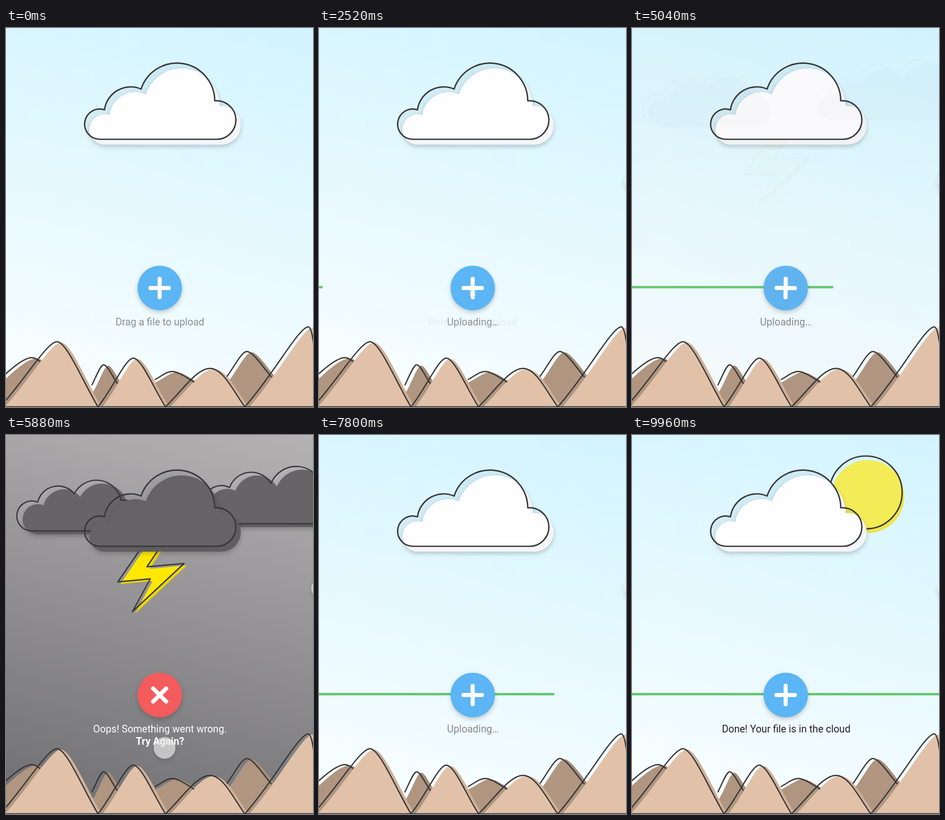
Recreate the animation shown at these times as an HTML page. Size 600 px wide and 739 px high, loop 10 s.

```html
<!DOCTYPE html>
<html lang="en">
<head>
<meta charset="utf-8">
<title>Upload</title>
<style>
  html, body { margin: 0; width: 100%; height: 100%; overflow: hidden; }
  body { background: linear-gradient(195deg, #d2f4ff, #f6fdff 88%); }
  .dark-sky { position: fixed; inset: 0; background: linear-gradient(195deg, #b4b2b3, #6e6d70); }
  svg { position: fixed; left: 0; top: 0; width: 600px; height: 739px; display: block; }
  text { font: 19.6px Roboto, sans-serif; text-anchor: middle; }
  .line { fill: none; stroke: #363638; stroke-width: 2.7; stroke-linejoin: round; }
  .thin { stroke-width: 2.4; }
  .raised { filter: drop-shadow(0 4px 4px rgba(0, 0, 0, .2)); }

  .anim { animation: 10s ease-in-out infinite; }
  .storm { animation-name: storm; }
  .calm { animation-name: calm; }
  .idle { animation-name: idle; }
  .busy { animation-name: busy; }
  .done { animation-name: done; }
  .bar { animation-name: bar, calm; }
  .icon { animation-name: icon; transform-origin: 300.3px 507px; }
  .sun { animation-name: sun; }
  .file { animation-name: file, idle; }
  .drag { animation-name: drag; }
  .tap { animation-name: tap; }

  @keyframes storm { 0%, 50% { opacity: 0 } 54%, 60.5% { opacity: 1 } 64.5%, 100% { opacity: 0 } }
  @keyframes calm { 0%, 50% { opacity: 1 } 54%, 60.5% { opacity: 0 } 64.5%, 100% { opacity: 1 } }
  @keyframes idle { 0%, 22.2% { opacity: 1 } 26.2%, 100% { opacity: 0 } }
  @keyframes busy {
    0%, 22.2% { opacity: 0 } 26.2%, 50% { opacity: 1 }
    54%, 60.5% { opacity: 0 } 64.5%, 84.8% { opacity: 1 } 88.8%, 100% { opacity: 0 }
  }
  @keyframes done { 0%, 84.8% { opacity: 0 } 88.8%, 100% { opacity: 1 } }
  @keyframes bar {
    0%, 22.6% { transform: scaleX(0) } 49.9%, 60.5% { transform: scaleX(.656) }
    64.5% { transform: scaleX(0) } 84.8%, 100% { transform: scaleX(1) }
  }
  @keyframes icon {
    0%, 50% { transform: rotate(0) } 54%, 60.5% { transform: rotate(45deg) }
    64.5%, 100% { transform: rotate(0) }
  }
  @keyframes sun {
    0%, 84.8% { transform: translate(-120px, 30px); opacity: 0 }
    86% { opacity: 1 }
    92%, 100% { transform: none; opacity: 1 }
  }
  @keyframes file {
    0%, 4% { transform: translate(660px, 300px) } 16%, 22.2% { transform: translate(300px, 510px) }
    26.2%, 100% { transform: translate(300px, 512px) scale(.3) }
  }
  @keyframes drag {
    0%, 4% { transform: translate(660px, 300px) } 16%, 20% { transform: translate(300px, 510px) }
    25%, 100% { transform: translate(618px, 299px) }
  }
  @keyframes tap {
    0%, 55.5% { transform: translate(309px, 770px) } 59.6%, 65% { transform: translate(310px, 597px) }
    70%, 100% { transform: translate(309px, 770px) }
  }
</style>
</head>
<body>
<div class="dark-sky anim storm"></div>
<svg viewBox="0 0 600 739">
  <g class="anim sun" id="sun"></g>
  <g id="shade"></g>
  <g class="anim calm" id="whiteCloud"></g>
  <g class="anim storm" id="bolt"></g>
  <g class="anim storm" id="leftCloud"></g>
  <g class="anim storm" id="rightCloud"></g>
  <g class="anim storm" id="darkCloud"></g>
  <g id="cloudLine"></g>

  <g id="hills" transform="translate(.7 .7)"></g>

  <rect class="anim bar" y="503" width="600" height="4.6" fill="#63c76d"/>
  <g class="raised">
    <circle class="anim calm" cx="300.5" cy="507" r="43.5" fill="#5cb5f4"/>
    <circle class="anim storm" cx="300.5" cy="507" r="43.5" fill="#f45b5c"/>
  </g>
  <path class="anim icon" d="M282.3 507h36M300.3 489v36" stroke="#fff" stroke-width="8" stroke-linecap="round"/>

  <text class="anim idle" x="300.8" y="580" fill="#8b9093">Drag a file to upload</text>
  <text class="anim busy" x="300.8" y="580" fill="#85898b">Uploading…</text>
  <text class="anim done" x="301.3" y="580" fill="#202224">Done! Your file is in the cloud</text>
  <g class="anim storm" fill="#fff">
    <text x="301" y="580">Oops! Something went wrong.</text>
    <text x="301" y="604" style="font-weight:700">Try Again?</text>
  </g>

  <g class="anim file">
    <path d="M-23-30H10L23-17V30H-23Z" fill="#fff" stroke="#363638" stroke-width="2.3" stroke-linejoin="round"/>
    <path d="M10-30V-17H23M-13-4H13M-13 7H13M-13 18H5" fill="none" stroke="#a5a5a8" stroke-width="2.3"/>
  </g>
  <g fill="#f8f8f8" fill-opacity=".62" stroke="#fff" stroke-opacity=".4">
    <circle class="anim drag raised" r="20.7"/>
    <circle class="anim tap raised" r="20.7"/>
  </g>
</svg>
<script>
  const $ = id => document.getElementById(id);
  const line = (d, cls = '') => `<path class="line ${cls}" d="${d}"/>`;
  const tint = (d, c) => `<path d="${d}" fill="${c}"/>`;
  const raised = s => `<g class="raised">${s}</g>`;
  let clips = 0;

  // Offset fill: shaded where it spills past its own outline.
  function fill(d, dx, dy, main, spill) {
    const id = 'clip' + clips++;
    const body = c => `<path d="${d}" transform="translate(${dx} ${dy})" fill="${c}"/>`;
    return `<clipPath id="${id}"><path d="${d}"/></clipPath>` +
      body(spill) + `<g clip-path="url(#${id})">${body(main)}</g>`;
  }

  const cloud = 'M182.5 217A29.5 29.5 0 1 1 192.5 159.5A51.5 51.5 0 0 1 264 119' +
    'A73.9 73.9 0 0 1 408 142A37.6 37.6 0 1 1 410.5 217Z';
  const left = 'M50 187A29.2 29.2 0 1 1 62 131A41 41 0 0 1 133.5 114.5A49 49 0 0 1 225 127.5A30 30 0 1 1 228 187Z';
  const right = 'M379 173A24.6 24.6 0 1 1 386.5 125.5A35.5 35.5 0 0 1 437 102.5' +
    'A45 45 0 0 1 518 94.5A53 53 0 0 1 619 103A35 35 0 1 1 624 173Z';
  const bolt = 'M265 219H301L275.5 257L348 250.5L247 344.5L282 280.5L218.5 286.5Z';
  const disc = 'M386 112a71 71 0 1 1 142 0a71 71 0 1 1 -142 0Z';

  $('sun').innerHTML = fill(disc, 4, 8, '#f3ec56', '#efe44c') + line(disc);
  $('bolt').innerHTML = fill(bolt, 5, 4, '#ffe800', '#eed500') + line(bolt, 'thin');
  for (const [id, d] of [['leftCloud', left], ['rightCloud', right]])
    $(id).innerHTML = tint(d, 'rgba(255,255,255,.08)') +
      raised(fill(d, 11.5, 6.5, '#666467', '#5f5d60')) + line(d, 'thin');
  $('shade').innerHTML = tint(cloud, 'rgba(0,40,60,.05)');
  $('whiteCloud').innerHTML = raised(fill(cloud, 9.5, 10.5, '#fefdff', '#f4f5f6'));
  $('darkCloud').innerHTML = raised(fill(cloud, 9.5, 10.5, '#656366', '#5f5d60'));
  $('cloudLine').innerHTML = line(cloud);

  const back = [
    'M-8 680Q32 642 50 642Q57 642 66 650',
    'M167 696C176 678 184 656 190 656C197 656 206 676 217 693',
    'M290 685C303 678 314 669 324 669C336 669 352 681 367 690',
    'M431 679C445 660 460 630 470 630C482 630 502 661 518 680'
  ];
  const front = [
    'M-12 738C40 680 80 611 99 611C118 611 150 690 179 738',
    'M179 738C208 702 233 643 248 643C264 643 288 702 311 738',
    'M311 738C345 705 372 663 398 663C424 663 445 710 466 738',
    'M466 738C520 678 572 582 590 582C597 582 600 612 604 640'
  ];
  // Right and left foot of each back hill, hidden behind the front row.
  const feet = [[100, -60], [225, 140], [380, 180], [530, 380]];
  const hill = (d, i) => d + `L${feet[i][0]} 745H${feet[i][1]}Z`;
  const closed = (d, i) => d + (i == 3 ? 'V745H466Z' : 'V745Z');

  $('hills').innerHTML =
    back.map((d, i) => fill(hill(d, i), 9, 1.5, '#b09680', '#a58c78')).join('') +
    front.map((d, i) => fill(closed(d, i), 8, 1.5, '#e1c2a9', i == 3 ? '#e1c2a9' : '#d0b098')).join('') +
    [...back, ...front, 'M-1 738H601'].map(d => line(d, 'thin')).join('');
</script>
</body>
</html>
```
